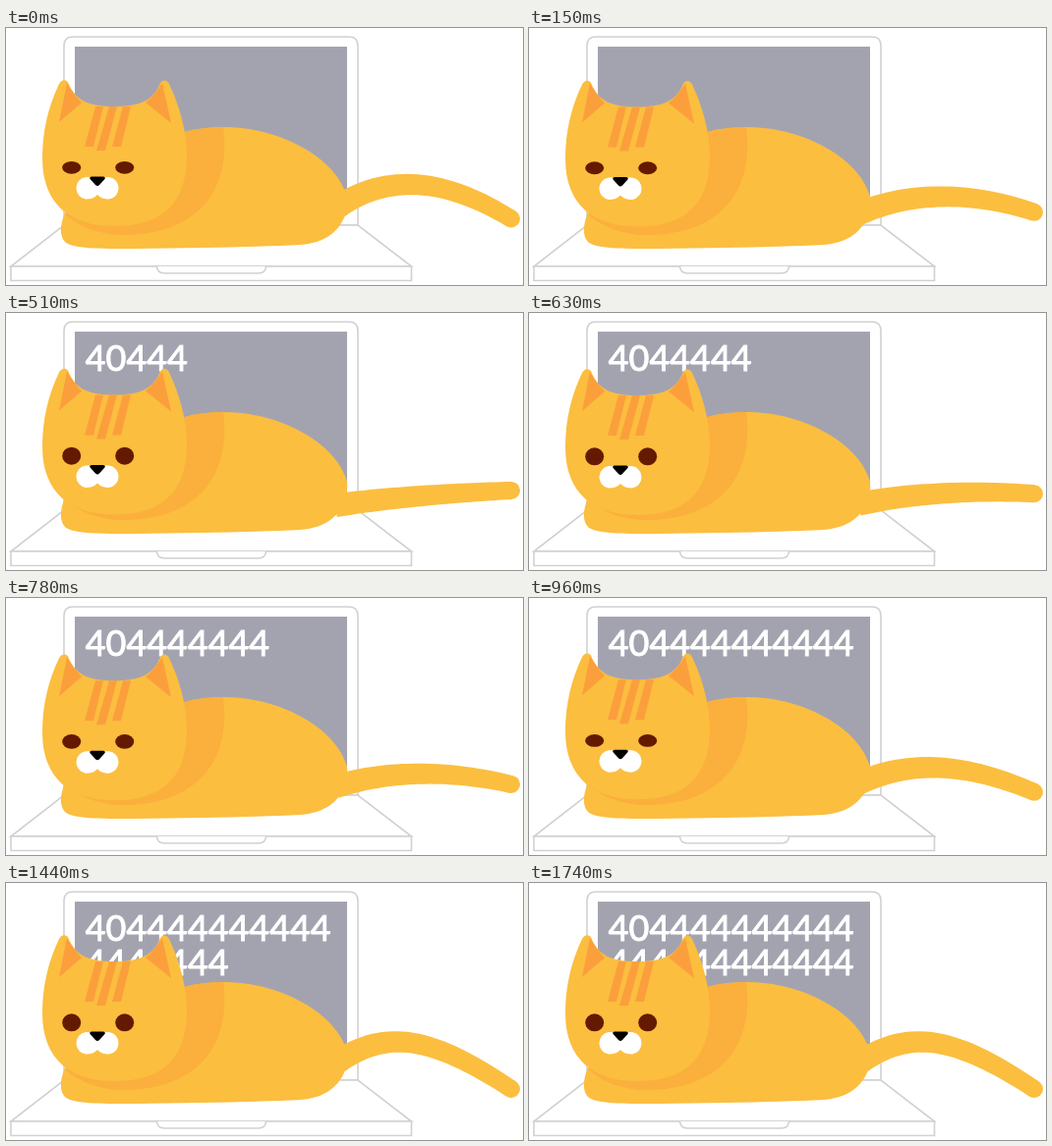
An HTML page that plays this animation: 526 by 262 pixels, repeating every 1800 ms.

```html
<!DOCTYPE html>
<html lang="en">
<head>
<meta charset="utf-8">
<title>404 cat</title>
<style>
  html, body { margin: 0; height: 100%; overflow: hidden; background: #fff; }
  svg { display: block; width: 526px; height: 262px; }
  text { font: 35.9px Lato, Arial, sans-serif; fill: #fff; stroke: #fff; stroke-width: 1; }
  .line { fill: #fff; stroke: #d1d1d2; stroke-width: 1.6; }
  .fur { fill: #fbbe3f; }
  .shade { fill: #fbaf3c; }
  .mark { fill: #fb9f3d; }
</style>
</head>
<body>
<svg viewBox="0 0 526 262">
  <g class="line">
    <path d="M59 201V18Q59 9 68 9H349Q358 9 358 18V201Z"/>
    <path d="M59 201H358L412.5 243H5Z"/>
    <path d="M5 243H412.5V257.5H5Z"/>
    <path d="M153.5 243Q154 250 161 250H257Q264 250 264.5 243"/>
  </g>
  <path fill="#a3a3b0" d="M70 19H347V191H70Z"/>
  <text id="row1" x="80.8" y="59.3"></text>
  <text id="row2" x="80.8" y="94.3"></text>

  <path id="tail" class="fur"/>
  <circle id="tip" class="fur" r="9"/>
  <path class="fur" d="M60 188C54 203 55 213 60 218C67 225 95 225 130 225C200 224 260 223 300 221C325 219 339 207 345 191Q348 182 347 172C335 130 275 101 222 101C205 101 190 103 175 108L100 180Z"/>
  <path class="shade" d="M221 101C205 101 190 103 175 108L100 180L60 190C75 203 95 211 120 211C190 211 230 170 221 101Z"/>

  <g id="head">
    <path class="fur" d="M63 55C60 52 56 53 54 57C43 80 37 105 37 133C37 180 66 202 110 202C160 202 184 178 184 130C184 105 176 78 166 57C164 53 160 52 157 56C150 74 136 80 110 80C84 80 70 74 63 55Z"/>
    <path class="mark" d="M62 56L54 96L77 76Q70 69 62 56ZM159 56L168 97L142 76Q150 70 159 56ZM91 80H99L89 121H80ZM105 80H113L101 125H92ZM119 80H127L117 121H108Z"/>
    <g fill="#641a00">
      <ellipse class="eye" cx="66.7" cy="142.3" rx="9.5"/>
      <ellipse class="eye" cx="120.7" cy="142.3" rx="9.5"/>
    </g>
    <path fill="#fff" d="M81 152H105A11.4 11.4 0 0 1 105 174.5Q97 174.5 93 170Q89 174.5 81 174.5A11.4 11.4 0 0 1 81 152Z"/>
    <path d="M87 151.5H99Q102 152 100 154.5L95 160Q93 162 91 160L86 154.5Q84 152 87 151.5Z"/>
  </g>
</svg>
<script>
const LOOP = 1800, STEP = 30, REST = 1440, TURN = 330;
const $ = id => document.getElementById(id);
const eyes = document.querySelectorAll('.eye');
const clamp = x => Math.max(0, Math.min(1, x));
const ease = x => (1 - Math.cos(Math.PI * clamp(x))) / 2;
const mix = (a, b, u) => a + (b - a) * u;

const bezier = (points, u) => points.length > 1
  ? bezier(points.slice(1).map(([x, y], i) => [mix(points[i][0], x, u), mix(points[i][1], y, u)]), u)
  : points[0];

// The tail straightens quickly, then curls again; its tip starts half curled
function drawTail(t) {
  const falling = t < TURN;
  const curl = falling ? 1 - ease(t / TURN) : ease((t - TURN) / (REST - TURN));
  const drop = falling ? curl / 2 : curl;
  const end = [514, mix(179, 210, drop)];
  const points = [
    [335, mix(197, 184, curl)],
    [388, mix(191, 147, curl)],
    [mix(460, 434, drop), 185 - 36 * curl + 8 * drop],
    end
  ];
  const upper = [], lower = [];
  for (let u = 0; u <= 1; u += 1 / 32) {
    const [x, y] = bezier(points, u), [p, q] = bezier(points, u + .001);
    const k = (12 - 3 * u) / Math.hypot(p - x, q - y);
    const nx = (q - y) * k, ny = (x - p) * k;
    upper.push([x + nx, y + ny]);
    lower.unshift([x - nx, y - ny]);
  }
  $('tail').setAttribute('d', 'M' + [...upper, ...lower].join('L') + 'Z');
  $('tip').setAttribute('cx', end[0]);
  $('tip').setAttribute('cy', end[1]);
}

function draw(now) {
  const t = Math.floor(now % LOOP / STEP) * STEP;
  const count = Math.max(0, Math.min(24, Math.floor((t - 120) / 67.4)));
  const typed = ('40' + '4'.repeat(22)).slice(0, count);
  $('row1').textContent = typed.slice(0, 12);
  $('row2').textContent = typed.slice(12);

  const pose = Math.min(t, REST);
  const nod = 4.2 * ease(1 - Math.abs(1 - 2 * pose / REST));
  $('head').setAttribute('transform', `translate(0 ${nod})`);
  const open = clamp(.5 - 1.2 * Math.cos(2 * Math.PI * (pose - 90) / 900));
  eyes.forEach(e => e.setAttribute('ry', mix(6.4, 9, open)));
  drawTail(t);
}

const start = performance.now();
function tick() {
  draw(performance.now() - start);
  requestAnimationFrame(tick);
}
tick();
</script>
</body>
</html>
```
